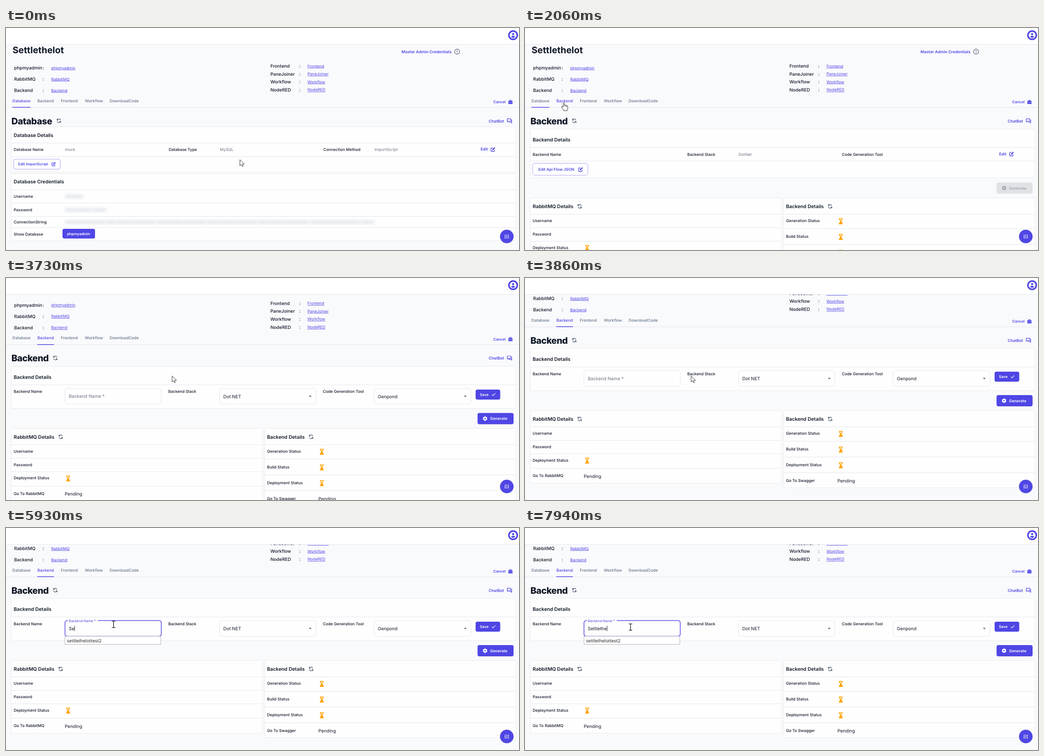
Recreate the animation shown at these times as an HTML page. Size 1135x493 px, loop 7990 ms.

```html
<!DOCTYPE html>
<html lang="en">
<head>
<meta charset="utf-8">
<title>Project console</title>
<style>
  html, body { margin: 0; width: 100%; height: 100%; overflow: hidden; background: #f9fafc; }
  svg { display: block; width: 100%; height: 100%; }
  text { font-family: Inter, sans-serif; text-rendering: geometricPrecision; white-space: pre; }
  .link { text-decoration: underline #8d87ee; text-decoration-thickness: .7px; text-underline-offset: 1.8px; }
  .native { font-family: "Open Sans", "Noto Sans", sans-serif; }
  .card { filter: drop-shadow(0 .9px .8px rgba(15, 23, 42, .15)); }
  .blur { filter: blur(3px); }
</style>
</head>
<body>
<svg id="stage" viewBox="0 0 1135 493"></svg>
<script>
const LOOP = 7990;
const INDIGO = '#4f46e5', INK = '#111827', GREY = '#6b7280', SLATE = '#475569', LINE = '#e2e6ee';

// Drawing helpers; cy is the vertical centre of the capitals.
const text = (x, cy, s, size = 8.72, weight = 500, fill = INK, more = '') =>
  `<text x="${x}" y="${cy + size * .364}" font-size="${size}" font-weight="${weight}" fill="${fill}" ${more}>${s}</text>`;
const rect = (x, y, w, h, fill, r = 0, more = '') =>
  `<rect x="${x}" y="${y}" width="${w}" height="${h}" rx="${r}" fill="${fill}" ${more}/>`;
const path = (d, stroke, width = 1, fill = 'none') =>
  `<path d="${d}" stroke="${stroke}" stroke-width="${width}" fill="${fill}" stroke-linejoin="round"/>`;
const at = (x, y, body, scale = 1) => `<g transform="translate(${x} ${y}) scale(${scale})">${body}</g>`;
const group = (id, body) => `<g id="${id}">${body}</g>`;
const hline = (x1, x2, y) => rect(x1, Math.floor(y), x2 - x1, 1, LINE);
const card = (x, y, w, h) => rect(x, y, w, h, '#fefefe', 3, 'class="card"');
const heading = (x, cy, s) => text(x, cy, s, 10.75, 600);
const pageTitle = (cy, s) => text(12, cy, s, 20, 800, INK, 'letter-spacing="-.5"');
const link = (x, cy, s) => text(x, cy, s, 8.75, 400, INDIGO, 'class="link"');

const syncIcon = (x, y) => at(x, y,
  path('M-4 -4.4V-1.4H-1M-3.8 -1.6A4 4 0 0 1 3.7 -1.5M4 4.4V1.4H1M3.8 1.6A4 4 0 0 1 -3.7 1.5', SLATE, 1.2));
const editIcon = (x, y, scale = 1) => at(x, y,
  path('M-.4 -3.3H-3.3Q-4.4 -3.3 -4.4 -2.2V3.4Q-4.4 4.5 -3.3 4.5H2.2Q3.3 4.5 3.3 3.4V1', INDIGO, 1.3) +
  path('M-1.6 1.7V.2L3.2 -4.6L4.7 -3.1L-.1 1.7Z', INDIGO, .6, INDIGO), scale);
const hourglass = (x, y) => at(x, y,
  path('M-4 -6.2H4V-5H3.2V-2.8L.8 0L3.2 2.8V5H4V6.2H-4V5H-3.2V2.8L-.8 0L-3.2 -2.8V-5H-4Z', '#ffa200', .6, '#ffa200') +
  path('M-1.9 -4.8H1.9V-3L1.6 -2.5H-1.6L-1.9 -3Z', 'none', 0, '#fff'));
const gear = (x, y, color, hole) => at(x, y,
  [0, 60, 120].map(a => rect(-1.4, -5, 2.8, 10, color, .6, `transform="rotate(${a})"`)).join('') +
  `<circle r="3.7" fill="${color}"/><circle r="1.6" fill="${hole}"/>`);
const chatIcon = at(1114, 206,
  path('M-4.8 2.5V-4.4H3V1H-3.2Z', INDIGO, 1.2) + path('M4.8 -2.5V5L2.8 3H-2.6', INDIGO, 1.2));
const toolboxIcon = at(1116, 164.3,
  path('M-1.8 -2.2V-4H1.8V-2.2', INDIGO, 1.2) + rect(-4.8, -2.4, 9.6, 3, INDIGO, 1) + rect(-4.8, 1.2, 9.6, 3.2, INDIGO, 1));

const generate = (fill, color) =>
  rect(1043.3, 328, 79.7, 25, fill, 4) + gear(1060, 340.5, color, fill) + text(1071, 340.5, 'Generate', 8.65, 600, color);
const field = (x, w, id = '') => rect(x, 273.5, w, 35, '#fefefe', 5, `stroke="${LINE}" id="${id}"`);
const select = (x, w, s) => field(x, w) + text(x + 8.3, 291.4, s, 10, 400) +
  `<path d="M${x + w - 15.5} 289.8h6.4l-3.2 3.2z" fill="#5f6673"/>`;

const projectLinks = () => {
  const left = [['phpmyadmin', 88.6], ['RabbitMQ', 113.6], ['Backend', 138.6]];
  const right = [['Frontend', 84.6], ['PaneJoiner', 102.1], ['Workflow', 119.6], ['NodeRED', 137.5]];
  const rows = (list, x, colon, to) => list.map(([s, y]) =>
    text(x, y, s, 10) + text(colon, y, ':', 10) + link(to, y - .2, s)).join('');
  return rows(left, 18, 81, 100) + rows(right, 585, 648.5, 667);
};

const tabs = [['Database', 14.3], ['Backend', 69.5], ['Frontend', 121.3], ['Workflow', 174.5], ['DownloadCode', 229.3]];
const topPart = text(14.5, 48.5, 'Settlethelot', 20, 700) +
  text(875, 52.5, 'Master Admin Credentials', 8.85, 600, INDIGO) +
  at(998, 52.5, `<circle r="5.6" fill="none" stroke="${SLATE}" stroke-width="1.1"/>` +
    rect(-.6, -3, 1.2, 3.8, SLATE) + rect(-.6, 1.7, 1.2, 1.2, SLATE)) +
  projectLinks() + hline(0, 1135, 176.5) +
  tabs.map(([s, x], i) => text(x, 161.4, s, 8.8, 500, '#64748b', `id="tab${i}"`)).join('') +
  rect(14, 175.4, 40, 1.5, INDIGO, 0, 'id="underline"') +
  text(1078, 164.4, 'Cancel', 8.2, 600, INDIGO) + toolboxIcon +
  text(1068, 206.4, 'ChatBot', 8.7, 600, INDIGO) + chatIcon;

const smear = (y, w, dash) =>
  `<path class="blur" d="M131 ${y}l${w} .01" stroke="#94a3b8" stroke-width="8" stroke-opacity=".24" stroke-dasharray="${dash}"/>`;
const databaseView = pageTitle(206.5, 'Database') + syncIcon(117, 206) +
  card(12, 220, 1116, 99) + heading(17, 238, 'Database Details') + hline(12, 1128, 255.5) + hline(12, 1128, 285) +
  [[17, 'Database Name', 'mock'], [360, 'Database Type', 'MySQL'], [702, 'Connection Method', 'ImportScript']]
    .map(([x, k, v]) => text(x, 270.2, k) + text(x + 113.3, 270.2, v, 8.75, 400, GREY)).join('') +
  text(1050, 269.3, 'Edit', 8.75, 600, INDIGO) + editIcon(1077.5, 269.5) +
  rect(17, 291.2, 103, 22.3, '#fff', 4, 'stroke="#a5a0f0"') +
  text(27, 302.3, 'Edit ImportScript', 8.15, 600, INDIGO) + editIcon(105.5, 302, .9) +
  card(12, 324, 1116, 148) + heading(17, 341.5, 'Database Credentials') +
  [359, 388, 418, 443].map(y => hline(12, 1128, y)).join('') +
  [['Username', 374], ['Password', 404], ['ConnectionString', 431], ['Show Database', 457.7]]
    .map(([s, y]) => text(17, y, s)).join('') +
  smear(374, 40, '18 1 22 1') + smear(404, 91, '25 1 34 2') + smear(431, 684, '34 1 52 2 23 1') +
  rect(125, 446, 72, 21.5, INDIGO, 4) + text(135, 456.6, 'phpmyadmin', 8.15, 600, '#fff');

const detailLabels = text(17, 280.5, 'Backend Name') + text(359, 280.5, 'Backend Stack') + text(701, 280.5, 'Code Generation Tool');
const summary = card(12, 225, 1116, 107) + heading(17, 248, 'Backend Details') +
  hline(12, 1128, 265.5) + hline(12, 1128, 295) + detailLabels +
  text(472.5, 280.5, 'DotNet', 8.75, 400, GREY) +
  text(1049, 279.5, 'Edit', 8.75, 600, INDIGO) + editIcon(1076.5, 279.5) +
  rect(17, 300.5, 122, 26.5, '#fff', 4.5, 'stroke="#a5a0f0"') +
  text(29.5, 314, 'Edit Api Flow JSON', 8.6, 600, INDIGO) + editIcon(123, 314);
const form = card(12, 225, 1116, 92.5) + heading(17, 248, 'Backend Details') + hline(12, 1128, 265.5) + detailLabels +
  field(130.5, 213, 'nameBox') + rect(137, 272, 66, 4, '#fefefe', 0, 'id="notch"') +
  text(139, 291, 'Backend Name *', 10, 400, GREY, 'id="label"') + text(139, 291.4, '', 10, 400, INK, 'id="typed"') +
  rect(139, 285, .9, 12, INK, 0, 'id="caret"') +
  select(472.5, 213, 'Dot NET') + select(814.5, 214, 'Genpond') +
  rect(1039, 276, 54.5, 22.3, INDIGO, 4) + text(1048.5, 287.2, 'Save', 8.15, 600, '#fff') +
  path('M1075 287.2l2.6 2.6l5 -5.4', '#fff', 1.2);

const statusCard = (x, w, h, title, icon, rows, glyphX) => card(x, 363, w, h) +
  heading(x + 5, 381.3, title) + syncIcon(icon, 381) + hline(x, x + w, 398.5) +
  rows.map(([s, dy, kind], i) => text(x + 5, 363 + dy, s) +
    (kind === 'wait' ? hourglass(glyphX, 364 + dy) : kind ? text(glyphX - 7.5, 363.6 + dy, kind, 10, 400) : '') +
    (i < rows.length - 1 ? hline(x, x + w, 363 + (dy + rows[i + 1][1]) / 2 + .3) : '')).join('');
const statusCards =
  statusCard(12, 555, 160, 'RabbitMQ Details', 121,
    [['Username', 50.3], ['Password', 80], ['Deployment Status', 109.5, 'wait'], ['Go To RabbitMQ', 144.3, 'Pending']], 137.5) +
  statusCard(572.5, 555.5, 170, 'Backend Details', 675,
    [['Generation Status', 50.3, 'wait'], ['Build Status', 85, 'wait'], ['Deployment Status', 120, 'wait'], ['Go To Swagger', 155, 'Pending']], 698.7);

const hints = ['settlethelottest2', 'settlethelot', 'sampletest'];
const hintList = rect(130.5, 308.5, 212, 18, '#fff', 0, 'stroke="#b0b3bb" id="hintBox"') +
  hints.map((s, i) => text(135, 318 + i * 18.6, s, 10, 400, '#111', `class="native" id="hint${i}"`)).join('');

const backendView = pageTitle(206.5, 'Backend') + syncIcon(109, 206) + group('summary', summary) + group('form', form) +
  group('lower', group('idle', generate('#e1e2e5', '#a3a6ad')) + group('ready', generate(INDIGO, '#fff')) + statusCards) +
  group('hintList', hintList);

const appBar = rect(0, 0, 1135, 36.5, '#fff') + hline(0, 1135, 36.5) +
  at(1122, 16, `<circle r="11" fill="${INDIGO}"/><circle r="7.6" fill="#fff"/><circle cy="-2.4" r="2.4" fill="${INDIGO}"/>` +
    `<path d="M-4.7 3.6Q0 -.9 4.7 3.6Q0 8 -4.7 3.6Z" fill="${INDIGO}"/>`);
const fab = at(1108, 463, `<circle r="15" fill="${INDIGO}" class="card"/>` +
  path('M-3.6 -4.6V-.2M-3.6 2V4.8M0 -4.6V-2.8M0 -.6V4.8M3.6 -4.6V.6M3.6 2.8V4.8', '#fff', 1.1) +
  path('M-4.9 1.1H-2.3M-1.3 -1.7H1.3M2.3 1.7H4.9', '#fff', 1.1));

const pointers =
  group('arrow', path('M.5 .5V14L3.6 11.2L5.8 15.8L7.8 14.9L5.7 10.4H10.2Z', '#222', .9, '#fff')) +
  group('hand', path('M-1.6 9V1.6Q-1.6 .4 -.2 .4Q1.2 .4 1.2 1.6V6.2Q3.6 5.2 3.9 7Q6.2 6.2 6.4 7.9Q8.7 7.4 8.7 9.6V13Q8.7 15 7.3 16.4V18.6H-.6V16.8L-4.8 11.4Q-5.5 9.6 -3.8 9.2Q-2.6 9.2 -1.6 10.8Z', '#222', .95, '#fff') +
    path('M1.2 6.2V9.4M3.9 7V9.6M6.4 7.9V10', '#222', .8)) +
  group('beam', path('M-3.8 -7.2H-1Q0 -7.2 0 -6V6Q0 7.2 -1 7.2H-3.8M3.8 -7.2H1Q0 -7.2 0 -6M0 6Q0 7.2 1 7.2H3.8', '#111', 1.3));

document.getElementById('stage').innerHTML = rect(0, 0, 1135, 493, '#f9fafc') +
  group('page', topPart + group('database', databaseView) + group('backend', backendView)) + appBar + fab +
  '<circle id="press" cx="86" cy="165" r="10.5" fill="#64748b" fill-opacity=".16"/>' + group('pointer', pointers);

const $ = id => document.getElementById(id);
const show = (id, on) => { $(id).style.display = on ? '' : 'none'; };
const set = (id, attrs) => { for (const k in attrs) $(id).setAttribute(k, attrs[k]); };
const mix = (a, b, p) => a + (b - a) * p;
const progress = (t, start, length) => Math.min(1, Math.max(0, (t - start) / length));
const smooth = p => p * p * (3 - 2 * p);
const easeOut = p => 1 - (1 - p) ** 3;

// Timeline: [ms, x, y] for the pointer, [ms, offset] for the scroll.
const OPEN = 2060, EDITING = 2270, FOCUS = 4510;
const pointerKeys = [[310, 517, 292], [1040, 86, 166], [1380, 86, 166], [1390, 86, 165], [2080, 86, 165], [2560, 386, 223],
  [2910, 386, 223], [3230, 367, 217], [3980, 367, 217], [4460, 231, 227.5], [4840, 231, 227.5], [5380, 241, 221],
  [5560, 241, 221], [5920, 238, 214], [6340, 238, 214], [6780, 246, 208], [7160, 247, 211], [7920, 233.5, 220]];
const scrollKeys = [[3610, 0], [3650, 5], [3730, 28], [3800, 54], [3860, 68]];
const TYPED = 'Settlethe';
const strokes = [5580, 5860, 6070, 6270, 6470, 6680, 6880, 7080, 7700];

function sample(keys, t, ease) {
  if (t <= keys[0][0]) return keys[0].slice(1);
  const i = keys.findIndex(k => k[0] >= t);
  if (i < 0) return keys[keys.length - 1].slice(1);
  const a = keys[i - 1], b = keys[i], p = ease((t - a[0]) / (b[0] - a[0]));
  return a.slice(1).map((v, n) => mix(v, b[n + 1], p));
}

function drawField(t) {
  const focused = t >= FOCUS, lift = easeOut(progress(t, FOCUS, 200));
  const size = mix(10, 7.5, lift);
  set('nameBox', { stroke: focused ? INDIGO : LINE, 'stroke-width': focused ? 1.5 : 1 });
  set('label', { 'font-size': size, y: mix(291, 274, lift) + size * .364, fill: focused ? INDIGO : GREY });
  show('notch', focused);

  const count = strokes.filter(s => s <= t).length;
  $('typed').textContent = TYPED.slice(0, count);
  const since = t - (count ? strokes[count - 1] : FOCUS);
  show('caret', focused && Math.floor(since / 530) % 2 === 0);
  set('caret', { x: 139.2 + (count ? $('typed').getComputedTextLength() : 0) });

  const rows = count === 1 ? 3 : 1;
  show('hintList', count > 0);
  set('hintBox', { height: rows * 18.6 - .6 });
  hints.forEach((_, i) => show('hint' + i, i < rows));
}

function draw(t) {
  const opened = t >= OPEN, editing = t >= EDITING;
  show('database', !opened);
  show('backend', opened);
  show('summary', !editing);
  show('form', editing);
  show('idle', !editing);
  show('ready', editing);
  set('lower', { transform: `translate(0 ${editing ? 0 : 15})` });
  set('tab0', { fill: opened ? '#64748b' : INDIGO });
  set('tab1', { fill: opened ? INDIGO : '#64748b' });
  const slide = smooth(progress(t, OPEN, 300));
  set('underline', { x: mix(14, 69, slide), width: mix(40, 37, slide) });
  show('press', t >= 1590 && t < 1730);

  const [scroll] = sample(scrollKeys, t, p => p);
  set('page', { transform: `translate(0 ${-scroll})` });
  drawField(t);

  const [x, y] = sample(pointerKeys, t, smooth);
  const hand = x > 69 && x < 107 && y < 178, beam = t > 4000 && x < 343;
  show('hand', hand);
  show('beam', beam);
  show('arrow', !hand && !beam);
  set('pointer', { transform: `translate(${x} ${y})` });
}

function tick() {
  draw(performance.now() % LOOP);
  requestAnimationFrame(tick);
}
tick();
</script>
</body>
</html>
```
